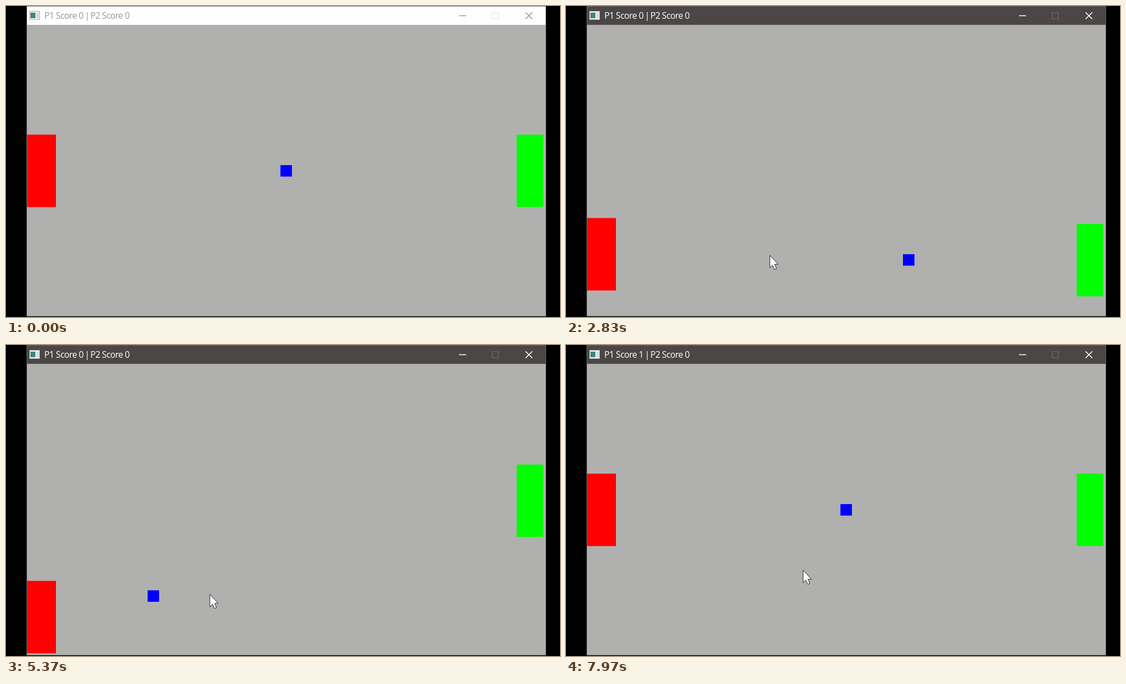
These frames come from a looping animation (998 px wide and 561 px high, 8 s). An HTML page:

```html
<!DOCTYPE html>
<html lang="en">
<head>
<meta charset="utf-8">
<title>Paddle game</title>
<style>
  html, body { margin: 0; width: 100%; height: 100%; overflow: hidden; background: #000; }
  svg { display: block; width: 998px; height: 561px; }
  text { font: 15.8px "Open Sans", "Noto Sans", sans-serif; letter-spacing: -0.6px; }
</style>
</head>
<body>
<svg viewBox="0 0 998 561">
  <defs>
    <clipPath id="field"><rect x="38" y="34" width="934" height="525.5"/></clipPath>
  </defs>
  <rect width="998" height="561"/>
  <rect id="bar" x="37" width="936" height="35"/>
  <rect x="37" y="34" width="936" height="526" fill="#b0b0af"/>
  <rect id="edge" x="37.5" y="0.5" width="935" height="559" fill="none"/>

  <g>
    <rect x="42.5" y="9.5" width="18" height="15" fill="#f2f2f2" stroke="#aaa"/>
    <rect x="44" y="12" width="9" height="10" fill="#3f8582"/>
    <rect x="55" y="12" width="4" height="10" fill="#d8d8d8"/>
  </g>
  <g id="label">
    <text id="left" x="69" y="22.5"></text>
    <text x="142" y="22.5">|</text>
    <text x="152" y="22.5">P2 Score 0</text>
  </g>
  <g id="buttons" fill="none" stroke-width="1.7">
    <path d="M816 17.5h13M936 11.5l12 12M948 11.5l-12 12"/>
    <rect id="max" x="876" y="12" width="11" height="11" stroke-width="1"/>
  </g>

  <g clip-path="url(#field)">
    <rect id="red" x="38" width="52" height="130.7" fill="#f00"/>
    <rect id="green" x="920" width="48" height="130.5" fill="#0f0"/>
    <rect id="ball" width="20.7" height="20.7" fill="#00f"/>
    <path id="cursor" d="M0 0V22.5L5 18L8.5 25.5L12 24L8.7 16.3H15Z"
          fill="#fff" stroke="#222"/>
  </g>
</svg>
<script>
const LOOP = 8, FPS = 30, FOCUS = 0.95, SERVE = 0.982, GOAL = 6.46;
const HOME = 232, KEY_STEP = 21.5;
const LEFT = 56.8, WIDTH = 808.8, TOP = 34, HEIGHT = 505;
const $ = id => document.getElementById(id);

// [time, value]: the slope of the ball's path changes at paddle hits
const climb = [[SERVE, 253], [2.3, 215], [4.73, 1126], [GOAL, 1925]];
// [time, y]: turning points of the right paddle
const turns = [[2.351, HOME], [3.009, 429], [4.73, 95], [6.03, 346], [GOAL, 250]];
// [time, steps]: held keys of the left paddle, repeating once per frame
const keys = [[1.15, -5], [2.32, 12], [3.28, -12], [3.95, 8], [5, 6]];

const clamp = p => Math.min(1, Math.max(0, p));
const linear = p => p;
const smooth = p => p * p * (3 - 2 * p);
const ease = (t, from, to) => smooth(clamp((t - from) / (to - from)));

// Runs through the points, shaping each span with curve.
function along(points, t, curve) {
  let value = points[0][1];
  for (let i = 1; i < points.length; i++) {
    const [t0, a] = points[i - 1], [t1, b] = points[i];
    value += (b - a) * curve(clamp((t - t0) / (t1 - t0)));
  }
  return value;
}

// Folds a straight distance into bounces between 0 and size.
const bounce = (d, size) => size - Math.abs(d % (2 * size) - size);

// The ball gains a little speed; the sixth crossing ends in a miss.
function ballX(t) {
  const s = Math.max(t, SERVE) - 1.73;
  const d = 1129.4 + 932.6 * s + 10.35 * s * s;
  return LEFT + (d > 6 * WIDTH ? d - 6 * WIDTH : bounce(d, WIDTH));
}

const ballY = t => TOP + bounce(along(climb, t, linear), HEIGHT);

function redY(t) {
  const steps = keys.reduce((sum, [at, n]) => {
    const repeats = Math.max(0, Math.floor((t - at) * FPS));
    return sum + Math.sign(n) * Math.min(Math.abs(n), repeats);
  }, 0);
  return HOME + KEY_STEP * steps;
}

function set(id, attrs) {
  for (const name in attrs) $(id).setAttribute(name, attrs[name]);
}

function draw(t) {
  const active = t >= FOCUS, scored = t >= GOAL;
  const play = scored ? 0 : t;

  set("bar", { fill: active ? "#4b4747" : "#fefefe" });
  set("edge", { stroke: active ? "#676565" : "#777" });
  set("label", { fill: active ? "#fff" : "#999" });
  set("buttons", { stroke: active ? "#fff" : "#999" });
  set("max", { stroke: active ? "#767272" : "#ddd" });
  $("left").textContent = "P1 Score " + (scored ? 1 : 0);

  set("ball", { x: ballX(play), y: ballY(play) });
  set("red", { y: redY(play) });
  set("green", { y: along(turns, play, smooth) });

  const enter = ease(t, 0.17, 0.85), leave = ease(t, 6.77, 7.9);
  const x = 367.2 + 60 * leave, y = 565 - 115.3 * enter - 43.5 * leave;
  set("cursor", { transform: `translate(${x} ${y})` });
}

const start = performance.now();
function tick() {
  const t = (performance.now() - start) / 1000 % LOOP;
  draw(Math.floor((t + 0.004) * FPS) / FPS - 0.0033);
  requestAnimationFrame(tick);
}
tick();
</script>
</body>
</html>
```
